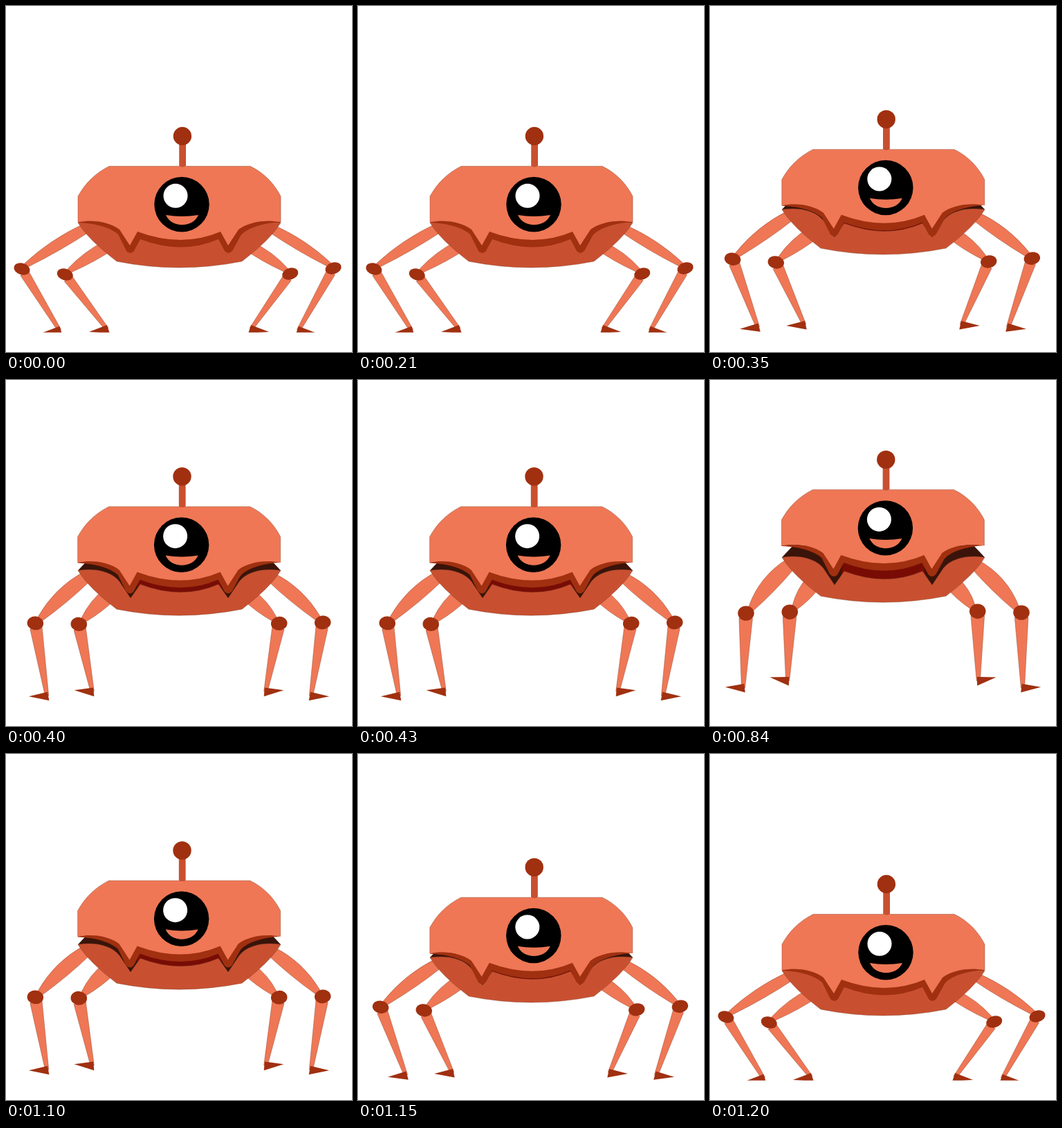
Write an HTML page that moves like this. It is 500x500 px and loops after 1250 ms.

```html
<!DOCTYPE html>
<html lang="en">
<head>
<meta charset="utf-8">
<title>Crab robot</title>
<style>
  html, body { margin: 0; width: 100%; height: 100%; overflow: hidden; background: #fff; }
  svg { display: block; width: 100%; height: 100%; }
  .coral { fill: #ef7755; }
  .rust { fill: #c85030; }
  .brown { fill: #a03010; }
  .edge { stroke: #7a3a28; stroke-width: .4; }
</style>
</head>
<body>
<svg viewBox="0 0 500 500">
  <clipPath id="floor"><rect width="500" height="471.700"/></clipPath>
  <g id="legs" clip-path="url(#floor)"></g>
  <g id="jaw">
    <path fill="#3a140a" d="M104 313 L120 296 H381 L397 313 L340 345 L321 354 L307 334 H194 L180 354 L160 345Z"/>
    <path fill="#780c05" d="M189 341 L193 318 H308 L312 341 Q254 360 189 341Z"/>
    <path class="rust edge" d="M104 313 C130 309 153 315 164 329 L180 353 L194 333 Q254 356 307 333 L321 353 L337 329 C348 315 371 309 397 313 C386 331 368 348 341 369 Q250 387 160 369 C133 348 115 331 104 313Z"/>
  </g>
  <g id="shell">
    <path class="brown" d="M104 312 C125 308 150 312 164 322 L179 338 L190 325 H310 L321 338 L336 322 C350 312 376 308 397 312 C368 314 347 322 339 332 L327 354 Q321 360 316 354 L307 337 Q254 360 194 337 L185 354 Q180 360 174 354 L162 330 C152 321 132 314 104 313Z"/>
    <path class="coral" d="M104 275 C114 257 128 242 149 231.500 H353 C373 241 388 257 397 275 V312.500 C376 308 350 312 336 323 L321 346 L310 326 Q254 350 190 326 L179 346 L164 323 C150 312 125 308 104 312.500Z"/>
    <path fill="none" class="edge" d="M104 312 V275 C114 257 128 242 149 231.500 H353 C373 241 388 257 397 275 V312"/>
    <path class="rust" d="M250.200 195 H260 V231 Q255 234 250.200 231Z"/>
    <circle class="brown" cx="254.900" cy="188" r="13.200"/>
    <circle cx="254" cy="286.800" r="39.700"/>
    <circle cx="245" cy="274.300" r="17.500" fill="#fff"/>
    <path class="coral" d="M231 302 Q254 306 278 302 C270 321 239 321 231 302Z"/>
  </g>
</svg>
<script>
const LOOP = 1250, RISE_AT = 350, FALL_AT = 1100, STEP_MS = 50, TOP_STEP = 3;
const SHELL_RISE = 24.3, JAW_RISE = 18.9;

// Crouched left legs: how each joint moves and turns with one step of lift.
const LEGS = [
  { knee: [23, 380], move: [9.67, -14.3], shin: 104, grow: 1.3, angle: 31.5, swing: 11.2,
    hipTop: [112, 315], hipLow: [121, 326], lowRise: 17.5, bow: 8, bowGrow: 2.5, footTurn: 3.8 },
  { knee: [85.3, 388], move: [10, -17.6], shin: 99.5, grow: 0, angle: 37.5, swing: 13.1,
    hipTop: [142, 340], hipLow: [158, 350], lowRise: 16.5, bow: 6, bowGrow: 0, footTurn: 6.7 }
];

const add = (a, b) => [a[0] + b[0], a[1] + b[1]];

// A point `along` the line a-b, moved `across` it.
function offset(a, b, along, across) {
  const dx = b[0] - a[0], dy = b[1] - a[1], len = Math.hypot(dx, dy);
  return [a[0] + (dx * along + dy * across) / len, a[1] + (dy * along - dx * across) / len];
}

function bend(a, b, bow) {
  return offset(a, b, Math.hypot(b[0] - a[0], b[1] - a[1]) / 2, bow);
}

// Right legs are mirrored; their knees sit slightly closer in when crouched.
function legMarkup(leg, step, right) {
  const base = add(leg.knee, leg.move.map(v => v * step));
  const a = (leg.angle - leg.swing * step) * Math.PI / 180;
  const shinLen = leg.shin + leg.grow * step;
  const ankle = add(base, [shinLen * Math.sin(a), shinLen * Math.cos(a)]);
  const knee = right ? add(base, [4 - 2 * step, -1]) : base;

  const hipTop = add(leg.hipTop, [0, -JAW_RISE * step + (right ? 2 : 0)]);
  const hipLow = add(leg.hipLow, [0, -leg.lowRise * step]);
  const top = add(knee, [4, -8.3 - 0.6 * step]), low = add(knee, [11, -4]);
  const thigh = `M${knee}L${top}Q${bend(top, hipTop, leg.bow + leg.bowGrow * step)} ${hipTop}
    L${hipLow}Q${bend(low, hipLow, -3)} ${low}Z`;

  const wide = 6.8 + step, end = Math.hypot(ankle[0] - knee[0], ankle[1] - knee[1]);
  const shin = [[7, wide], [end, 2.6], [end, -2.6], [7, -wide]]
    .map(([along, across]) => offset(knee, ankle, along, across)).join("L");

  return `<g ${right ? 'transform="translate(500) scale(-1 1)"' : ""}>
    <path class="coral edge" d="${thigh}"/>
    <path class="coral edge" d="M${shin}Z"/>
    <path class="brown" d="M-26 4L0 -6L4 6Z" transform="translate(${ankle}) rotate(${leg.footTurn * step})"/>
    <ellipse class="brown" rx="11.8" ry="${8.3 + 0.8 * step}"
      transform="translate(${knee}) rotate(${16 - 5.3 * step})"/></g>`;
}

const get = id => document.getElementById(id);
const shell = get("shell"), jaw = get("jaw"), legs = get("legs");
let shown = -1;

function pose(step) {
  if (step === shown) return;
  shown = step;
  legs.innerHTML = LEGS.map(leg => legMarkup(leg, step, false) + legMarkup(leg, step, true)).join("");
  shell.setAttribute("transform", `translate(${-0.2 * step} ${-SHELL_RISE * step})`);
  jaw.setAttribute("transform", `translate(0 ${-JAW_RISE * step})`);
}

function stepAt(t) {
  const up = 1 + Math.floor((t - RISE_AT) / STEP_MS);
  const down = TOP_STEP - 1 - Math.floor((t - FALL_AT) / STEP_MS);
  return Math.max(0, Math.min(up, down, TOP_STEP));
}

const start = performance.now();
function tick() {
  pose(stepAt((performance.now() - start) % LOOP));
  requestAnimationFrame(tick);
}
tick();
</script>
</body>
</html>
```
